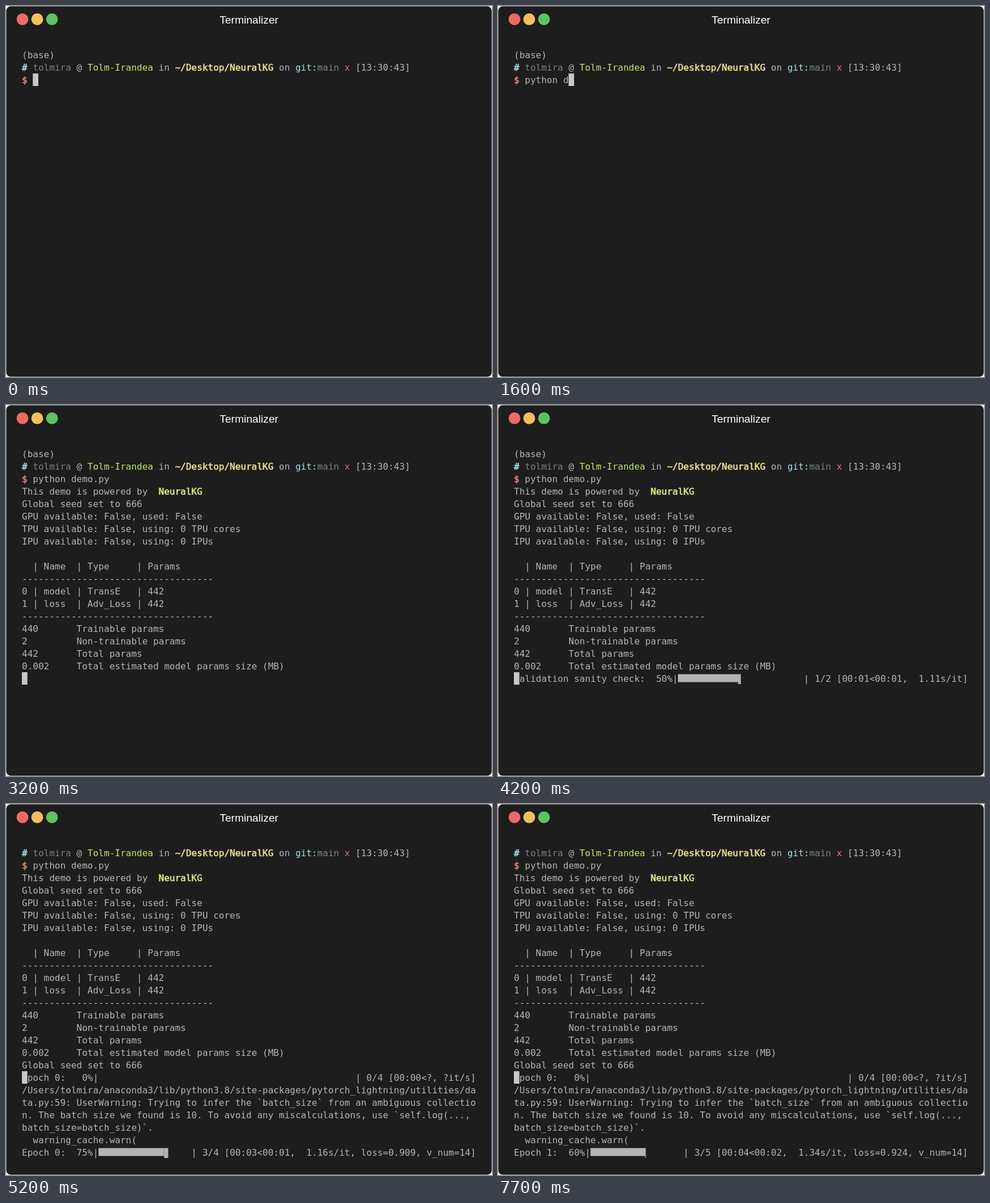
Animation of 856 by 654 pixels, one loop 8 s. Source, as an HTML page with a canvas:

```html
<!DOCTYPE html>
<html lang="en">
<head>
<meta charset="utf-8">
<title>Terminal</title>
<style>
  html, body { margin: 0; width: 100%; height: 100%; overflow: hidden; background: #fff; }
  canvas { display: block; }
</style>
</head>
<body>
<canvas id="stage" width="856" height="654"></canvas>
<script>
const ctx = document.getElementById('stage').getContext('2d');
const LOOP = 8000, COLS = 83;
const LEFT = 28, TOP = 75, CELL = 9.633, ROW = 22, BASELINE = 17;
const MONO = '16px "DejaVu Sans Mono", monospace';
const BLOCKS = ' ▏▎▍▌▋▊▉█';
const COLOR = {
  window: '#1d1d1d', text: '#b4b4b4', cursor: '#c5c9c6', dim: '#788182',
  blue: '#a5dce8', green: '#c2e862', lime: '#d6ec7c', yellow: '#ebdf8a',
  red: '#e9686a', salmon: '#e58277'
};

const span = (text, color = COLOR.text, bold = false) => ({ text, color, bold });

const promptRow = [
  span('#', COLOR.blue, true), span(' tolmira', COLOR.dim), span(' @ '),
  span('Tolm-Irandea', COLOR.green), span(' in '),
  span('~/Desktop/NeuralKG', COLOR.yellow, true), span(' on '),
  span('git:', COLOR.blue), span('main', COLOR.dim),
  span(' x', COLOR.red), span(' [13:30:43]')
];
const banner = [span('This demo is powered by  '), span('NeuralKG', COLOR.lime, true)];
const rule = '-'.repeat(35);
const summary = [
  'Global seed set to 666',
  'GPU available: False, used: False',
  'TPU available: False, using: 0 TPU cores',
  'IPU available: False, using: 0 IPUs',
  '',
  '  | Name  | Type     | Params',
  rule,
  '0 | model | TransE   | 442',
  '1 | loss  | Adv_Loss | 442',
  rule,
  '440       Trainable params',
  '2         Non-trainable params',
  '442       Total params',
  '0.002     Total estimated model params size (MB)'
];
const warning = [
  '/Users/tolmira/anaconda3/lib/python3.8/site-packages/pytorch_lightning/utilities/da',
  'ta.py:59: UserWarning: Trying to infer the `batch_size` from an ambiguous collectio',
  'n. The batch size we found is 10. To avoid any miscalculations, use `self.log(...,',
  'batch_size=batch_size)`.',
  '  warning_cache.warn('
];

function progress(label, done, total, stats) {
  const head = `${label}: ${String(Math.floor(done / total * 100)).padStart(3)}%|`;
  const tail = `| ${done}/${total} [${stats}]`;
  const width = COLS - head.length - tail.length;
  const eighths = Math.floor(width * 8 * done / total);
  const bar = '█'.repeat(eighths >> 3) + (eighths % 8 ? BLOCKS[eighths % 8] : '');
  return head + bar.padEnd(width) + tail;
}

const idle = '00:00<?, ?it/s';
const sanity = (done, stats) => progress('Validation sanity check', done, 2, stats);
const epoch = (n, done, total, stats, loss) =>
  progress('Epoch ' + n, done, total, `${stats}, loss=${loss}, v_num=14`);

const epochStart = progress('Epoch 0', 0, 4, idle);
const training = [
  [7700, epoch(1, 3, 5, '00:04<00:02,  1.34s/it', '0.924')],
  [7200, epoch(1, 2, 5, '00:02<00:04,  1.35s/it', '0.928')],
  [6700, epoch(1, 1, 5, '00:01<00:05,  1.36s/it', '0.931')],
  [6200, epoch(1, 0, 5, idle, '0.932')],
  [5700, epoch(0, 4, 4, '00:04<00:00,  1.12s/it', '0.932')],
  [5200, epoch(0, 3, 4, '00:03<00:01,  1.16s/it', '0.909')]
];

function screenAt(t) {
  const command = 'python demo.py';
  const typed = t < 2300 ? Math.min(9, Math.floor(t / 200)) : command.length;
  const rows = ['(base)', promptRow,
    [span('$', COLOR.salmon, true), span(' ' + command.slice(0, typed))]];
  let cursor = [2 + typed, 2];
  if (t >= 2500) cursor = [0, 3];
  if (t >= 2700) { rows.push(banner); cursor = [0, 4]; }
  if (t >= 3200) { rows.push(...summary); cursor = [0, 18]; }
  if (t >= 4700) rows.push('Global seed set to 666', epochStart);
  else if (t >= 4200) rows.push(sanity(1, '00:01<00:01,  1.11s/it'));
  else if (t >= 3700) rows.push(sanity(0, idle));
  if (t >= 5200) {
    rows.push(...warning, training.find(([start]) => t >= start)[1]);
    rows.shift();
  }
  return { rows, cursor };
}

function drawSpan({ text, color, bold }, col, top) {
  const letters = text.replace(/[▏▎▍▌▋▊▉█]/g, ' ');
  const left = LEFT + col * CELL;
  ctx.font = MONO;
  ctx.fillStyle = ctx.strokeStyle = color;
  ctx.fillText(letters, left, top + BASELINE);
  // A thin outline gives a lighter bold than the bold face.
  if (bold) ctx.strokeText(letters, left, top + BASELINE);

  const first = text.search(/[▏▎▍▌▋▊▉█]/);
  if (first < 0) return;
  const full = text.split('█').length - 1;
  const x = left + first * CELL;
  ctx.fillRect(x, top + 3.5, full * CELL, 14);
  // Partial blocks reach lower than full ones.
  const part = BLOCKS.indexOf(text[first + full]);
  if (part > 0) ctx.fillRect(x + full * CELL, top + 3.5, CELL * part / 8, 17.5);
}

function drawRow(row, index) {
  let col = 0;
  for (const part of typeof row === 'string' ? [span(row)] : row) {
    drawSpan(part, col, TOP + index * ROW);
    col += part.text.length;
  }
}

function drawWindow() {
  ctx.fillStyle = '#fff';
  ctx.fillRect(0, 0, 856, 654);
  ctx.fillStyle = COLOR.window;
  ctx.beginPath();
  ctx.roundRect(0.5, 0.5, 855, 653, 8);
  ctx.fill();
  ['#ec6a68', '#f3bf5e', '#5ec363'].forEach((color, i) => {
    ctx.fillStyle = color;
    ctx.beginPath();
    ctx.arc(29 + 26 * i, 23.4, 10.4, 0, Math.PI * 2);
    ctx.fill();
  });
  ctx.fillStyle = '#fff';
  ctx.font = '19.2px "Liberation Sans", Arial, sans-serif';
  ctx.textAlign = 'center';
  ctx.fillText('Terminalizer', 428, 31);
  ctx.textAlign = 'left';
}

function draw(now) {
  const { rows, cursor: [col, row] } = screenAt(now % LOOP);
  drawWindow();
  ctx.lineWidth = 0.6;
  rows.forEach(drawRow);
  ctx.fillStyle = COLOR.cursor;
  ctx.fillRect(LEFT + col * CELL, TOP + row * ROW, CELL, ROW);
}

let start;
function tick(now) {
  start ??= now;
  draw(now - start);
  requestAnimationFrame(tick);
}
draw(0);
requestAnimationFrame(tick);
</script>
</body>
</html>
```
